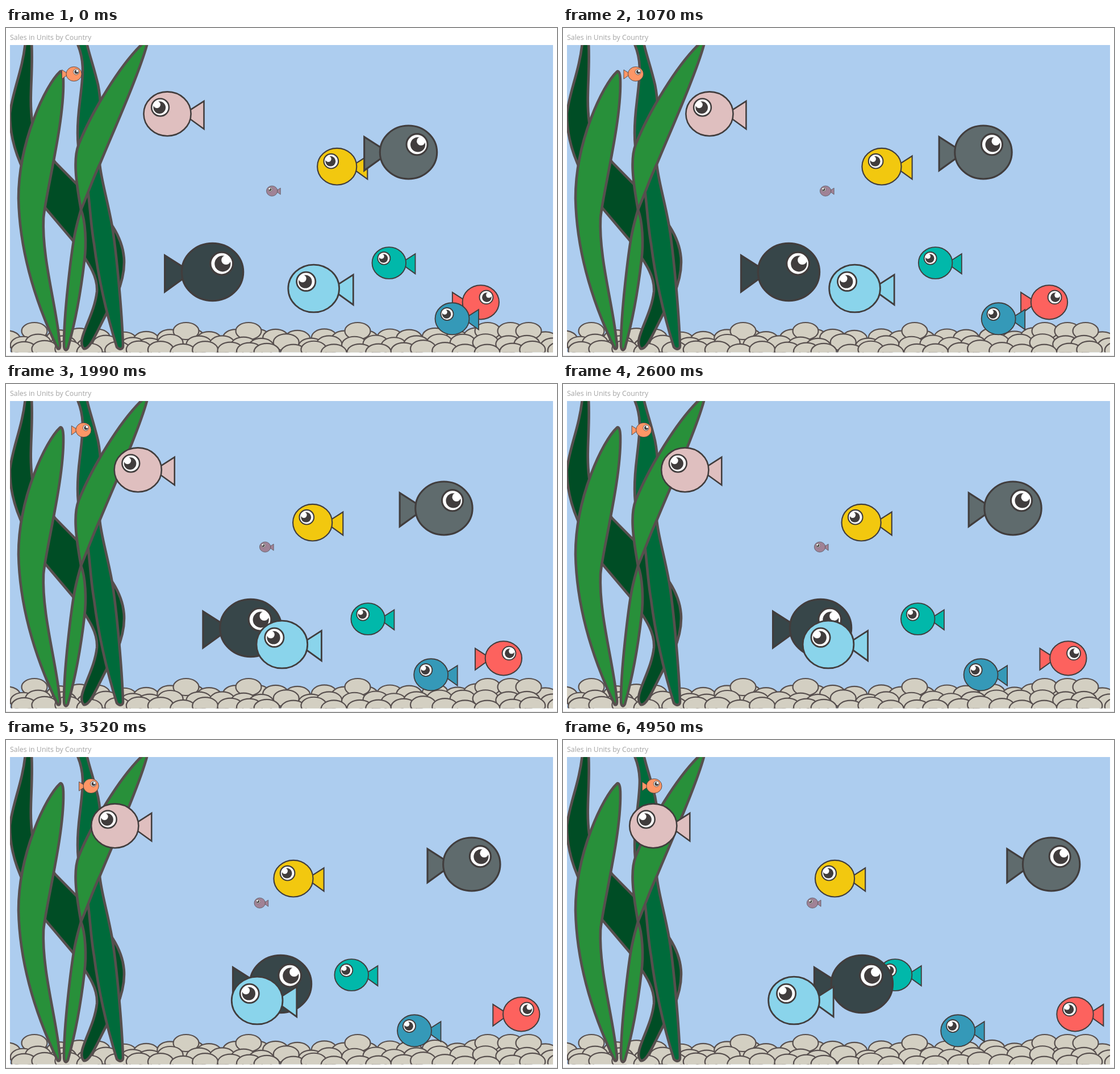
Write an HTML page with a canvas that moves like this. It is 970 px wide and 578 px high and loops after 5030 ms.

```html
<!DOCTYPE html>
<html lang="en">
<head>
<meta charset="utf-8">
<title>Sales in Units by Country</title>
<style>
  html, body { margin: 0; width: 100%; height: 100%; overflow: hidden; background: #fff; }
  canvas { display: block; }
</style>
</head>
<body>
<canvas id="stage" width="970" height="578"></canvas>
<script>
const W = 970, H = 578, TAU = Math.PI * 2;
const LOOP = 5030, STEPS = 63, STEP_MS = 78.57;
const TANK = { x: 7, y: 30, w: 956, h: 541.5 };
const WALL = 949.3;   // the nose turns back here
const TRAVEL = 3.01;  // distance per loop, in body radii
const INK = '#413d3d', EDGE = '#574f4e';
const ctx = document.getElementById('stage').getContext('2d');

// back to front; dir 1 swims right
const FISH = [
  { x: 119.5, y: 81, r: 13.6, dir: 1, color: '#fe9666' },
  { x: 284, y: 151.3, r: 41.6, dir: -1, color: '#dfbfbf' },
  { x: 582.7, y: 244.2, r: 34.6, dir: -1, color: '#f2c80f' },
  { x: 708.5, y: 219, r: 50.2, dir: 1, color: '#5f6b6d' },
  { x: 468.2, y: 287.2, r: 9.7, dir: -1, color: '#a08296' },
  { x: 674.3, y: 414, r: 29.8, dir: -1, color: '#01b8aa' },
  { x: 363.5, y: 430, r: 54.1, dir: 1, color: '#374649' },
  { x: 541.7, y: 459, r: 44.9, dir: -1, color: '#8ad4eb' },
  { x: 835.8, y: 483.3, r: 32.2, dir: 1, color: '#fd625e' },
  { x: 785.5, y: 512.3, r: 30, dir: -1, color: '#3599b8' }
];

const LEAVES = [
  ['#004d25', 'M34 26C29 75 12 110 7 150C6 215 36 265 70 318L119 376C150 420 162 440 160 465C155 510 122 550 137 565C150 568 165 520 195 470C216 420 210 385 188 350L151 302L87 237C60 205 48 185 46 165C40 120 48 80 45 26Z'],
  ['#006b3b', 'M125 26C140 60 135 85 130 130C125 170 124 200 130 225C148 270 146 330 155 380C165 460 182 520 195 562C200 568 206 566 206 560C204 500 195 400 187 350C178 300 168 270 165 240C163 190 172 150 162 100C155 70 146 45 142 26Z'],
  ['#28903a', 'M95 77C70 100 22 200 22 300C24 400 55 490 91 565C97 568 95 555 94 550C88 488 63 405 66 335C70 290 102 170 101 95C101 80 98 74 95 77Z'],
  ['#28903a', 'M132 320C140 340 142 380 138 410C130 480 120 525 109 564C106 570 102 568 102 558C102 500 115 400 119 375C123 350 128 335 132 320Z'],
  ['#28903a', 'M242 26C200 65 150 150 128 205C118 230 123 270 132 320C145 290 155 260 166 238C182 198 236 78 249 26Z']
].map(([color, d]) => ({ color, path: new Path2D(d) }));

const HIGH_STONES = [50, 317, 427, 619, 848, 888, 920];

function seeded(seed) {
  return () => (seed = seed * 16807 % 2147483647) / 2147483647;
}

function ellipse(g, x, y, rx, ry, fill, stroke) {
  g.beginPath();
  g.ellipse(x, y, rx, ry, 0, 0, TAU);
  g.fillStyle = fill;
  g.fill();
  if (stroke) {
    g.strokeStyle = stroke;
    g.stroke();
  }
}

function clipTank(g) {
  g.beginPath();
  g.rect(TANK.x, TANK.y, TANK.w, TANK.h);
  g.clip();
}

function drawStones(g) {
  const random = seeded(4711);
  const stone = (x, y) => ellipse(g, x, y, 22.5, 15, '#d3cfc2', EDGE);
  g.lineWidth = 2.2;
  for (let row = 0; row < 3; row++) {
    for (let x = 10; x < 985; x += 39) {
      stone(x + row * 13 + (random() - .5) * 16, 547 + row * 11 + (random() - .5) * 8);
    }
    if (row === 0) HIGH_STONES.forEach(x => stone(x, 534));
  }
}

function makeScene() {
  const scene = document.createElement('canvas');
  scene.width = W;
  scene.height = H;
  const g = scene.getContext('2d');
  g.fillStyle = '#fff';
  g.fillRect(0, 0, W, H);
  g.fillStyle = '#e2e2e2';
  g.fillRect(0, 577, W, 1);
  g.fillStyle = '#a3a3a3';
  g.font = '12.4px "Open Sans", "Noto Sans", sans-serif';
  g.fillText('Sales in Units by Country', 7, 20.5);

  clipTank(g);
  g.fillStyle = '#adcdef';
  g.fillRect(TANK.x, TANK.y, TANK.w, TANK.h);
  drawStones(g);
  g.lineWidth = 4.6;
  g.lineJoin = 'round';
  g.strokeStyle = EDGE;
  for (const { color, path } of LEAVES) {
    g.fillStyle = color;
    g.fill(path);
    g.stroke(path);
  }
  return scene;
}

// even steps that run slightly ahead past the middle
function progress(t) {
  const u = Math.min(1, Math.floor(t / STEP_MS + .25) / STEPS);
  return u + .031 * Math.sin(Math.PI * u ** 1.3) ** 3;
}

function drawFish({ x, y, r, dir, color }, p) {
  x += dir * TRAVEL * r * p;
  const limit = WALL - r;
  if (x > limit) {
    x = 2 * limit - x;
    dir = -1;
  }
  ctx.save();
  ctx.translate(x, y);
  ctx.scale(r * dir, r);
  ctx.lineWidth = .062;
  ctx.fillStyle = color;
  ctx.strokeStyle = INK;
  ctx.beginPath();
  ctx.moveTo(-.8, -.06);
  ctx.lineTo(-1.55, -.54);
  ctx.lineTo(-1.55, .64);
  ctx.lineTo(-.8, .1);
  ctx.closePath();
  ctx.fill();
  ctx.stroke();
  ellipse(ctx, 0, 0, 1, .935, color, INK);
  ellipse(ctx, .3, -.275, .37, .37, '#fff', INK);
  ellipse(ctx, .33, -.27, .26, .26, INK);
  ellipse(ctx, .44, -.39, .15, .15, '#fff');
  ctx.restore();
}

const scene = makeScene();
const start = performance.now();

function frame() {
  const p = progress((performance.now() - start) % LOOP);
  ctx.drawImage(scene, 0, 0);
  ctx.save();
  clipTank(ctx);
  for (const fish of FISH) drawFish(fish, p);
  ctx.restore();
  requestAnimationFrame(frame);
}
frame();
</script>
</body>
</html>
```
